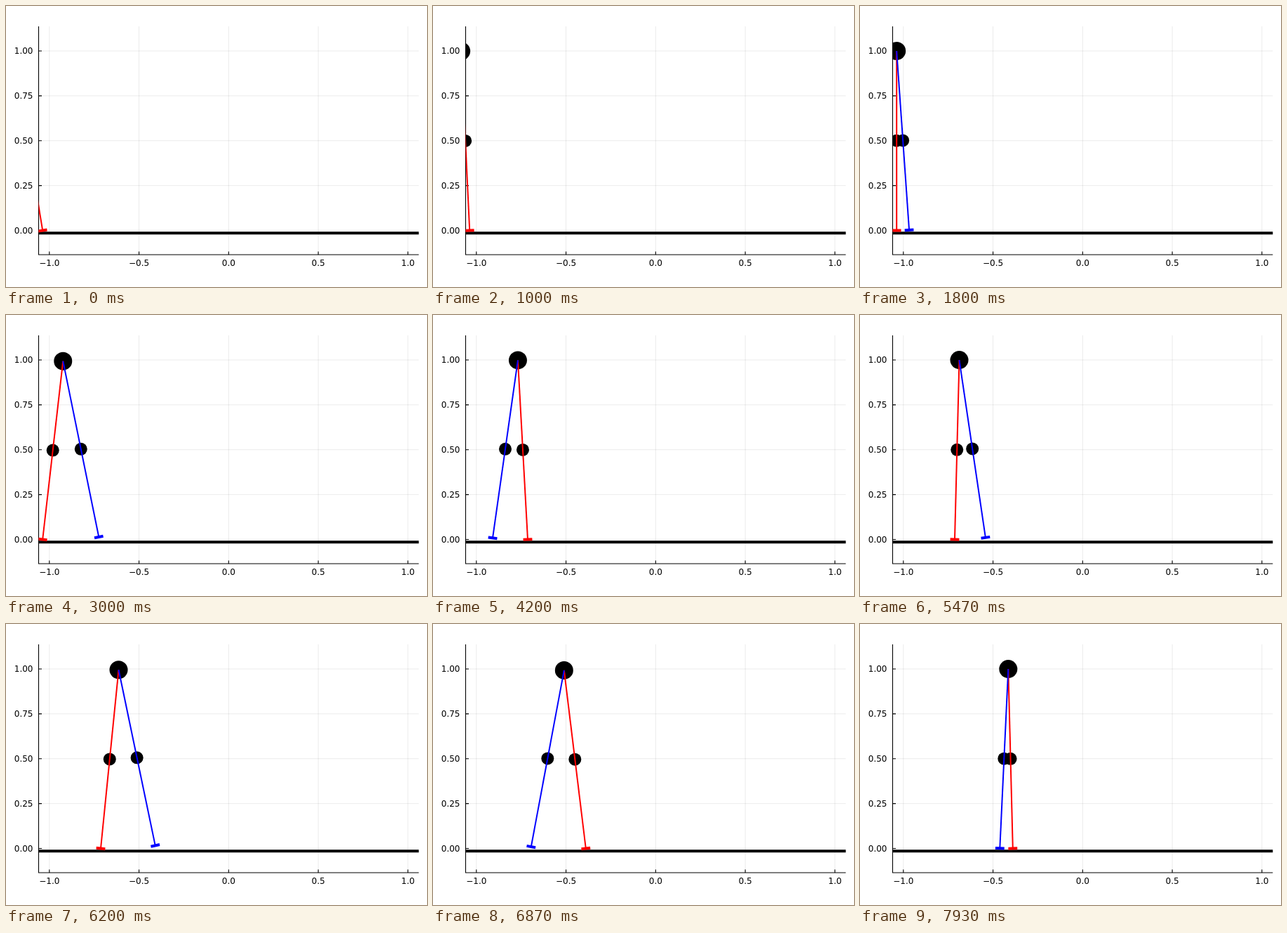
Recreate the animation shown at these times as an HTML page. Size 600 px wide and 400 px high, loop 8 s.

```html
<!DOCTYPE html>
<html lang="en">
<head>
<meta charset="utf-8">
<title>Compass walker</title>
<style>
  html, body { margin: 0; width: 100%; height: 100%; overflow: hidden; background: #fff; }
  svg { display: block; width: 600px; height: 400px; }
  text { font: 12px "DejaVu Sans", sans-serif; fill: #000; }
</style>
</head>
<body>
<svg viewBox="0 0 600 400">
  <clipPath id="plot"><rect x="46.5" y="29" width="541.8" height="325"/></clipPath>
  <g id="grid" stroke="#000" stroke-opacity=".1" stroke-width=".8"></g>
  <g id="axes" stroke="#000" stroke-width="1.1"><path d="M46.5 29V354.5M46 354H588.3"/></g>
  <g id="labels"></g>
  <g clip-path="url(#plot)">
    <path d="M46 323.2H589" stroke="#000" stroke-width="4"/>
    <circle id="hip" r="13"/>
    <circle id="kneeA" r="9"/>
    <circle id="kneeB" r="9"/>
    <g fill="none" stroke="#f00">
      <path id="legA" stroke-width="2"/>
      <path id="footA" stroke-width="4"/>
    </g>
    <g fill="none" stroke="#00f">
      <path id="legB" stroke-width="2"/>
      <path id="footB" stroke-width="4"/>
    </g>
  </g>
</svg>
<script>
const $ = id => document.getElementById(id);
const UNIT = 255.5, X0 = 317.3, Y0 = 319.5;
const LOOP = 8000, TICK = 1000 / 15;
const STEP_TIME = 3.3, STEP_LEN = 82.8, FIRST_FOOT = 52.2;

function add(parent, tag, attrs, text = '') {
  const el = document.createElementNS('http://www.w3.org/2000/svg', tag);
  for (const key in attrs) el.setAttribute(key, attrs[key]);
  el.textContent = text;
  $(parent).append(el);
}

function label(x, y, anchor, text) {
  add('labels', 'text', { x, y, 'text-anchor': anchor }, text);
}

for (let i = 0; i < 5; i++) {
  const vx = i / 2 - 1, x = X0 + vx * UNIT;
  const vy = i / 4, y = Y0 - vy * UNIT;
  add('grid', 'path', { d: `M${x} 29V354M46.5 ${y}H588.3` });
  add('axes', 'path', { d: `M${x} 354V349.5M46.5 ${y}H51` });
  label(x, 370, 'middle', vx.toFixed(1).replace('-', '−'));
  label(38.5, y + 4.4, 'end', vy.toFixed(2));
}

// Smooth curve through uneven points, with parabolic tangents
function curve(xs, ys) {
  const n = xs.length - 1;
  const h = i => xs[i + 1] - xs[i];
  const d = i => (ys[i + 1] - ys[i]) / h(i);
  const m = xs.map((_, i) => i > 0 && i < n
    ? (d(i - 1) * h(i) + d(i) * h(i - 1)) / (h(i - 1) + h(i)) : 0);
  m[0] = 2 * d(0) - m[1];
  m[n] = 2 * d(n - 1) - m[n - 1];
  return x => {
    let i = 0;
    while (i < n - 1 && x > xs[i + 1]) i++;
    const w = h(i), u = (x - xs[i]) / w, v = 1 - u;
    return v * v * ((1 + 2 * u) * ys[i] + u * w * m[i])
         + u * u * ((3 - 2 * u) * ys[i + 1] - v * w * m[i + 1]);
  };
}

// Leg angles in radians over one step
const phases = [0, .267, .9, 1.333, 1.8, 2.167, 2.6, 3, 3.3];
const stance = curve(phases, [-.163, -.1215, -.055, -.0255, 0, .0254, .0646, .114, .163]);
const swing = curve(phases, [-.163, -.185, -.141, -.047, .07, .147, .199, .201, .163]);

function place(id, x, y) {
  $(id).setAttribute('cx', x);
  $(id).setAttribute('cy', y);
}

function drawLeg(side, hx, hy, fx, fy) {
  const ux = (fx - hx) / UNIT * 6.4, uy = (fy - hy) / UNIT * 6.4;
  place('knee' + side, (hx + fx) / 2, (hy + fy) / 2);
  $('leg' + side).setAttribute('d', `M${hx} ${hy}L${fx} ${fy}`);
  $('foot' + side).setAttribute('d', `M${fx - uy} ${fy + ux}L${fx + uy} ${fy - ux}`);
}

function draw(ms) {
  const t = Math.floor((ms % LOOP + 3.4) / TICK) % 120 * TICK / 1000;
  const step = Math.floor(t / STEP_TIME), s = t - step * STEP_TIME;
  const a = stance(s), b = swing(s);
  const foot = FIRST_FOOT + step * STEP_LEN;
  const hx = foot + UNIT * Math.sin(a), hy = Y0 - UNIT * Math.cos(a);
  place('hip', hx, hy);
  drawLeg('A', hx, hy, foot, Y0);
  drawLeg('B', hx, hy, hx + UNIT * Math.sin(b), hy + UNIT * Math.cos(b));
}

const start = performance.now();
function loop() {
  draw(performance.now() - start);
  requestAnimationFrame(loop);
}
loop();
</script>
</body>
</html>
```
